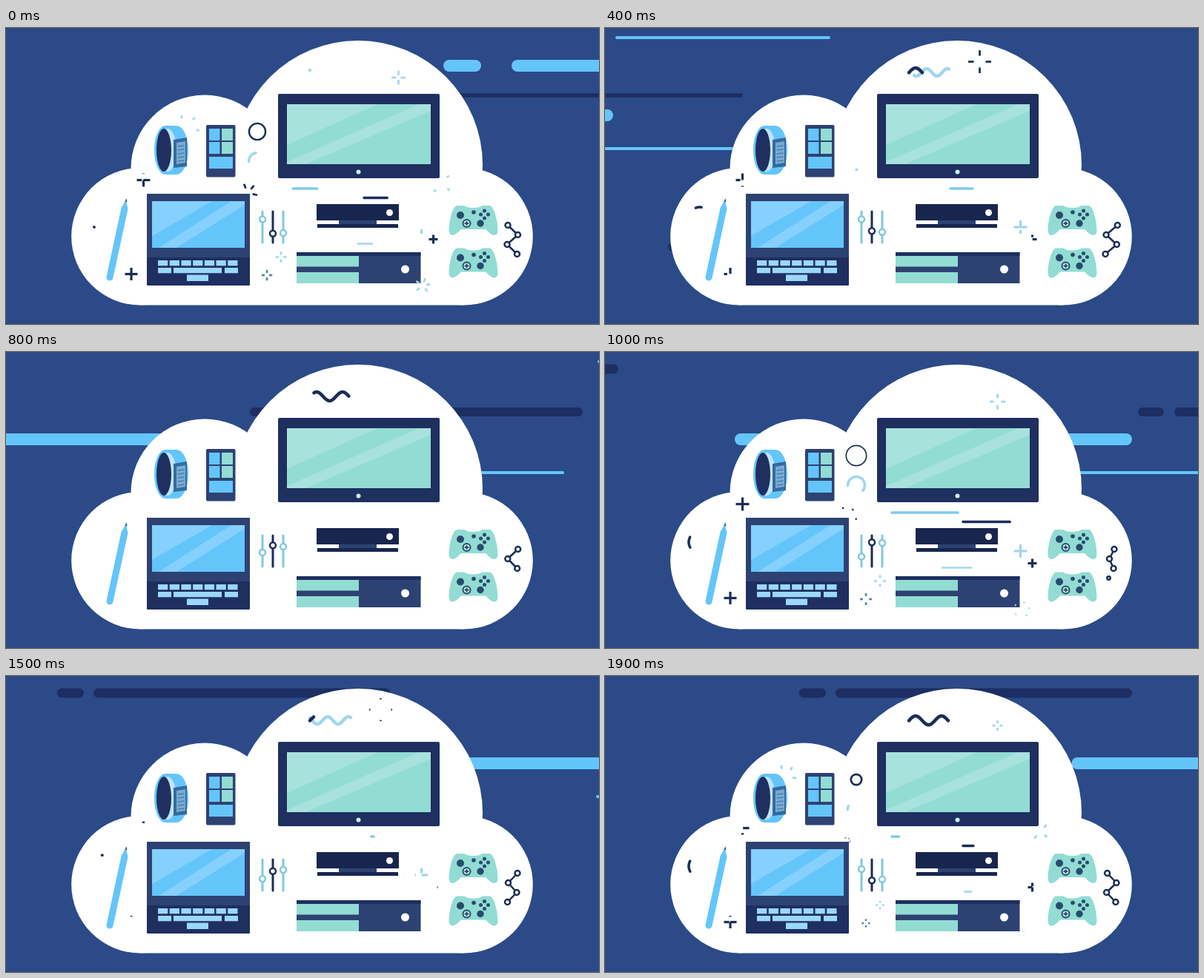
An HTML page with a canvas that plays this animation: 800x400 px, repeating every 2 s.

```html
<!DOCTYPE html>
<html lang="en">
<head>
<meta charset="utf-8">
<title>Devices in the cloud</title>
<style>
html, body { margin: 0; width: 100%; height: 100%; overflow: hidden; background: #2b4a87; }
canvas { display: block; width: 800px; height: 400px; }
</style>
</head>
<body>
<canvas id="stage" width="800" height="400"></canvas>
<script>
const c = document.getElementById('stage').getContext('2d');
const LOOP = 2000, STEP = 100, CYCLE = 960, RAD = Math.PI / 180;
const SKY = '#2b4a87', NAVY = '#1e2f60', SLATE = '#2d4272', BLUE = '#64c5fb',
  PALE = '#9ad8fb', TEAL = '#92dcd4', INK = '#1b2d57', MIST = '#a2d6ee', STREAK = '#1c2e63';

const clamp = v => Math.max(0, Math.min(1, v));
const smooth = v => (v = clamp(v), v * v * (3 - 2 * v));
const easeOut = v => 1 - (1 - clamp(v)) ** 2;
const mix = (a, b, k) => a + (b - a) * k;

// Time since the last start of a repeating part
const since = (t, start, period = CYCLE) => ((t - start) % period + period) % period;

// Tail and head (0 to 1) of a stroke that draws itself, then wipes away
function trim(t, [start, grow, wipe, end], period) {
  const q = since(t, start, period);
  return [easeOut((q - wipe) / (end - wipe)), smooth(q / grow)];
}

// ---- drawing helpers
function box(color, x1, y1, x2, y2, r = 0) {
  c.fillStyle = color;
  c.beginPath();
  c.roundRect(x1, y1, x2 - x1, y2 - y1, r);
  c.fill();
}
function oval(color, x, y, rx, ry = rx) {
  c.fillStyle = color;
  c.beginPath();
  c.ellipse(x, y, rx, ry, 0, 0, 7);
  c.fill();
}
function poly(color, ...p) {
  c.fillStyle = color;
  c.beginPath();
  for (let i = 0; i < p.length; i += 2) c.lineTo(p[i], p[i + 1]);
  c.closePath();
  c.fill();
}
function pen(color, width, cap = 'round') {
  c.strokeStyle = color;
  c.lineWidth = width;
  c.lineCap = cap;
  c.lineJoin = 'round';
}
function line(x1, y1, x2, y2) {
  c.beginPath();
  c.moveTo(x1, y1);
  c.lineTo(x2, y2);
  c.stroke();
}
function ring(x, y, r, color, width, fill = '#fff') {
  oval(fill, x, y, r);
  pen(color, width);
  c.stroke();
}

// ---- streaks behind the cloud
function streak(color, y, h, left, length, dash = 0, gap = 0) {
  const bar = (a, b) => box(color, a, y - h / 2, b, y + h / 2, h / 2);
  if (dash) bar(left, left + dash);
  bar(left + (dash ? dash + gap : 0), left + length);
}
// Slows down exponentially, passing x at time t0
const glide = (t, t0, x, reach, tau) => x + reach * (1 - Math.exp((t0 - t) / tau));
function streaks(t) {
  streak(BLUE, 51, 16, 590 + 1.17 * t, 480, 51, 41);
  for (const x of [600, -1434]) streak(STREAK, 91, 5.5, x + 3 * t, 420);
  streak(BLUE, 13, 4, -770 + 1.96 * t, 290);
  streak(STREAK, 296, 12, -695 + 1.95 * t, 449);
  streak(STREAK, 81, 12, -1231 + 1.95 * t, 449, 35, 14);
  streak(BLUE, 163, 4, glide(t, 1300, 731, 229, 600), 320);
  streak(BLUE, 118, 16, glide(t, 1000, 175, 705, 870), 536);
  streak(STREAK, 23, 13, glide(t, 1000, -431, 908, 625), 449, 36, 13);
}

// ---- still devices
function cloud() {
  oval('#fff', 475, 185, 168);
  oval('#fff', 268, 190, 99.5);
  for (const x of [181, 618]) oval('#fff', x, 281.7, 92.8);
  box('#fff', 181, 190, 618, 374.5);
}
function monitor() {
  box(NAVY, 367, 89, 585, 203, 2);
  box(TEAL, 379, 103, 573, 184);
  const shine = '#a8e2dd';
  poly(shine, 379, 103, 501, 103, 379, 158);
  poly(shine, 557, 103, 573, 103, 573, 112, 404, 184, 379, 184, 379, 181);
  oval('#c8eef0', 475.5, 194.5, 3);
}
function keys(count, x, y, width, pitch, height = 7.3) {
  for (let i = 0; i < count; i++) box(PALE, x + i * pitch, y, x + i * pitch + width, y + height);
}
function laptop() {
  box(NAVY, 190, 224, 329, 348, 1);
  box(SLATE, 190, 224, 329, 310);
  box(BLUE, 197, 234, 322, 297);
  const shine = '#85d0fc';
  poly(shine, 197, 234, 278, 234, 197, 281);
  poly(shine, 304, 234, 322, 234, 322, 239, 230, 297, 206, 297);
  keys(7, 205, 314, 13.3, 15.7);
  keys(2, 205, 324, 18, 90);
  keys(1, 226, 324, 65, 0);
  keys(1, 244, 333.5, 29, 0, 8.5);
}
function watch() {
  oval(BLUE, 215, 165, 15, 33);
  box(BLUE, 215, 132, 230, 198);
  oval(BLUE, 230, 165, 16, 33);
  oval('#bfe5fa', 218, 165, 12, 29);
  oval(NAVY, 213, 165, 10, 29);
  poly('#356a9f', 226, 151, 244, 148, 244, 187, 226, 189);
  poly('#79acd3', 230, 155, 242, 153, 242, 182, 230, 184);
  pen('#4a80b0', 1.5);
  for (let y = 160; y < 181; y += 5) line(232, y, 240, y - 1);
}
function phone() {
  box(SLATE, 270, 131, 309.5, 201.5, 2);
  for (const y of [136, 154]) {
    box(BLUE, 274, y, 288.5, y + 16);
    box(TEAL, 291, y, 306, y + 16);
  }
  box(BLUE, 274, 174, 306, 190);
}
function stylus() {
  pen(BLUE, 9);
  line(160, 244, 140, 337);
  poly(BLUE, 156, 243, 162, 231, 164, 244);
  poly('#315f8c', 160.5, 235, 162.5, 230, 163.5, 235);
}
function consoles() {
  box('#18264f', 419, 238, 530, 260);
  box(SLATE, 449, 260, 500, 266);
  box('#18264f', 420, 265, 529, 270);
  oval('#fff', 517.5, 249.5, 4.5);
  box(TEAL, 392, 303, 477, 345);
  box(SLATE, 476, 303, 559.5, 345);
  box(NAVY, 392, 303, 559.5, 308);
  box(SLATE, 392, 322.5, 477, 330);
  oval('#fff', 538.5, 326, 5.5);
}
function gamepad(y) {
  c.save();
  c.translate(630.5, y);
  c.fillStyle = TEAL;
  c.beginPath();
  c.moveTo(-23, -20);
  c.lineTo(-12, -20);
  c.quadraticCurveTo(-9, -17, 0, -17);
  c.quadraticCurveTo(9, -17, 12, -20);
  c.lineTo(23, -20);
  c.bezierCurveTo(29, -16, 33, 2, 33, 14);
  c.bezierCurveTo(32, 24, 23, 20, 17, 12);
  c.lineTo(-17, 12);
  c.bezierCurveTo(-23, 20, -32, 24, -33, 14);
  c.bezierCurveTo(-33, 2, -29, -16, -23, -20);
  c.fill();
  const dark = '#284c6c';
  oval(dark, -17.5, -7, 5);
  oval(dark, 9.5, 4, 4.7);
  oval(dark, 0.5, -11, 2.8);
  ring(-9, 4, 5, dark, 2, '#c5ece8');
  pen(dark, 2);
  line(-11, 4, -7, 4);
  line(-9, 2, -9, 6);
  for (let a = 0; a < 360; a += 90) oval(dark, 15 + 5 * Math.cos(a * RAD), -8 + 5 * Math.sin(a * RAD), 2.5);
  c.restore();
}

// ---- moving details
function sliders(t) {
  const turn = t / LOOP * 360;
  [216, 20, 30].forEach((phase, i) => {
    const x = 346 + 14 * i, color = i === 1 ? INK : '#80c9dc';
    pen(color, 3);
    line(x, 248, x, 290);
    ring(x, 267.5 + 11 * Math.cos((turn - phase) * RAD), 4, color, 2.5);
  });
}

// A zigzag chain that sways, folds up to two links and unfolds again
function chain(t) {
  const a = t / LOOP * 2 * Math.PI;
  const sway = 3 - 5 * Math.cos(a) - 5 * Math.cos(2 * a) + 2 * Math.sin(a);
  const count = t < 600 ? 4 - 2 * smooth((t - 450) / 150) : 2 + 2 * easeOut((t - 600) / 700);
  const x = i => 684 + (i % 2 ? -sway : sway) - i * 0.5, y = i => 266.5 + 13 * i;
  pen(INK, 2.5);
  for (let i = 1; i < 4; i++) if (count - i > 0.8) line(x(i - 1), y(i - 1), x(i), y(i));
  for (let i = 0; i < 4; i++) if (count > i) ring(x(i), y(i), 3.5 * clamp(count - i), INK, 2.5);
}

function ray(x, y, angle, r0, r1) {
  const u = Math.cos(angle * RAD), v = Math.sin(angle * RAD);
  if (r1 - r0 > 0.5) line(x + u * r0, y + v * r0, x + u * r1, y + v * r1);
}
function burst(t, x, y, angles, color, r0, r1, timing) {
  const [tail, head] = trim(t, timing);
  pen(color, 2.7, 'butt');
  for (const a of angles) ray(x, y, a, mix(r0, r1, tail), mix(r0, r1, head));
}
function bursts(t) {
  const cross = [0, 90, 180, 270], fan = [-112, -50, 12];
  const twinkle = [-60, 80, 80, 250], pop = [-25, 30, 10, 110], early = [-60, 60, 30, 110];
  burst(t, 529.5, 67, cross, MIST, 3, 10.5, twinkle);
  burst(t, 371, 309.5, cross, MIST, 3, 8, twinkle);
  burst(t, 352, 334, cross, '#55899f', 3, 8, twinkle);
  burst(t, 505.5, 45.5, cross, INK, 6, 15.5, [270, 90, 100, 380]);
  burst(t, 326, 223, fan, INK, 4, 14, pop);
  burst(t, 562, 348, [-70, -10, 50, 140, 215], MIST, 3, 11, pop);
  burst(t, 243, 135, fan, MIST, 8, 18, early);
  burst(t, 587, 210, [-45, 40, 130], MIST, 5, 15, early);
}

// Arms close in towards the centre one after another, later leave in the same order
const ARM = { R: 0, D: 90, L: 180, U: 270 };
function plus(t, x, y, r, color, order, start, hold) {
  const q = since(t, start);
  pen(color, 3.2, 'butt');
  [...order].forEach((arm, i) => {
    const shown = smooth((q - 12 * i) / 24) - smooth((q - hold - 80 * i) / 210);
    ray(x, y, ARM[arm], r * (1 - shown), r);
  });
}
function pluses(t) {
  plus(t, 185.5, 205.5, 9, INK, 'RDLU', -40, 200);
  plus(t, 169, 332.5, 8.5, INK, 'RDLU', -62, 200);
  plus(t, 560.5, 269, 9, MIST, 'DLUR', -15, 320);
  plus(t, 576.5, 285.5, 6, INK, 'DLUR', -60, 200);
}

function dash(t, from, to, y, color, width, timing) {
  const [tail, head] = trim(t, timing);
  const a = mix(from, to, tail), b = mix(from, to, head);
  pen(color, width);
  if (head > tail && Math.abs(b - a) > 1) line(a, y, b, y);
}
function arc(t, x, y, r, from, to, color, timing, period) {
  const [tail, head] = trim(t, timing, period);
  if (head <= tail) return;
  pen(color, 3.5);
  c.beginPath();
  c.arc(x, y, r, mix(from, to, tail) * RAD, mix(from, to, head) * RAD);
  c.stroke();
}
function strokes(t) {
  dash(t, 387, 496, 217, '#80cbe9', 3.5, [-40, 110, 250, 650]);
  dash(t, 483, 551, 229.5, INK, 3.5, [-52, 110, 150, 480]);
  dash(t, 494, 452, 291.5, MIST, 2.5, [-52, 110, 150, 480]);
  arc(t, 128, 257, 15, 126, 278, INK, [-15, 220, 60, 700], 900);
  arc(t, 339, 180, 11.5, 178, 450, MIST, [-40, 110, 150, 480]);
  const q = since(t, -45);
  if (q < 170) ring(339, 140, 13.7 * easeOut(q / 80), INK, 3.2 * (1 - q / 180));
}

function squiggle(t, from, to, amp, crest, period, color, timing) {
  const [tail, head] = trim(t, timing, 1120);
  if (head <= tail) return;
  const end = mix(from, to, head);
  pen(color, 4.5);
  c.beginPath();
  for (let x = mix(from, to, tail); x <= end; x++) {
    c.lineTo(x, 60 - amp * Math.cos((x - crest) / period * 2 * Math.PI));
  }
  c.stroke();
}
function squiggles(t) {
  squiggle(t, 410, 465, 5, 434, 28, MIST, [-20, 400, 400, 700]);
  squiggle(t, 410, 463, 6, 419, 35, INK, [360, 100, 430, 620]);
}

function draw(t) {
  c.fillStyle = SKY;
  c.fillRect(0, 0, 800, 400);
  streaks(t);
  cloud();
  monitor();
  laptop();
  watch();
  phone();
  stylus();
  consoles();
  gamepad(260);
  gamepad(317.5);
  sliders(t);
  chain(t);
  bursts(t);
  pluses(t);
  strokes(t);
  squiggles(t);
}

const start = performance.now();
function tick() {
  const t = (performance.now() - start) % LOOP;
  draw(Math.floor(t / STEP) * STEP);
  requestAnimationFrame(tick);
}
tick();
</script>
</body>
</html>
```
